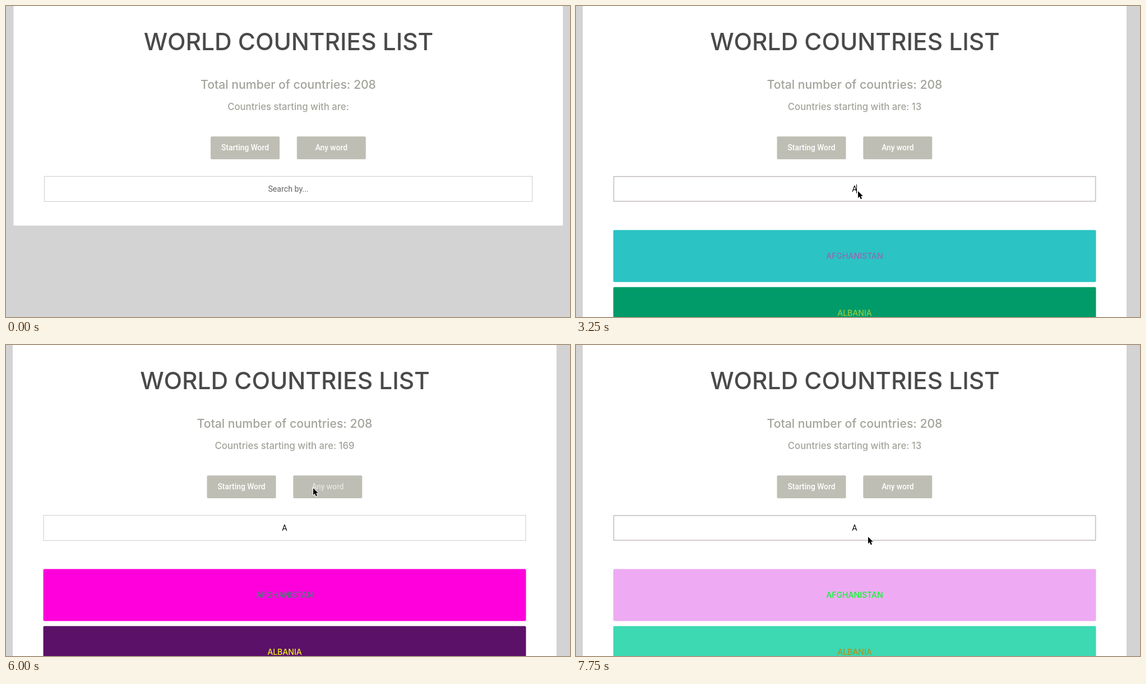
Recreate the animation shown at these times as an HTML page with a canvas. Size 1006 by 556 pixels, loop 8000 ms.

```html
<!DOCTYPE html>
<html lang="en">
<head>
<meta charset="utf-8">
<title>World countries list</title>
<style>
  html, body { margin: 0; width: 100%; height: 100%; overflow: hidden; background: #d3d3d3; }
  canvas { display: block; }
</style>
</head>
<body>
<canvas id="stage" width="1006" height="556"></canvas>
<script>
const ctx = document.getElementById('stage').getContext('2d');
const LOOP = 8000, TICK = 250;
const HEAD = 'Inter, sans-serif', BODY = 'Roboto, sans-serif';

// Pointer stops: time, x, y
const stops = [
  [250, 560, 279], [1250, 496, 329], [1500, 496, 329], [1750, 499, 329],
  [2000, 503, 331], [4500, 503, 331], [5750, 548, 256], [6000, 548, 256],
  [6750, 420, 257], [7250, 420, 257], [7750, 521, 343]
];
const caretOn = [[1250, 2000], [2500, 3000], [3250, 3750], [4250, 4750]];

// Search results: start time, count, then card and label colours
const results = [
  { at: 3250, count: 13, cards: [['#2bc3c3', '#9268b2'], ['#009b68', '#93cb45']] },
  { at: 6000, count: 169, cards: [['#ff00dc', '#3f8574'], ['#5b1168', '#f0f020']] },
  { at: 7250, count: 13, cards: [['#eeabf3', '#00ff28'], ['#3cd9b2', '#b0901e']] }
];

function pointerAt(t) {
  if (t < stops[0][0]) return null;
  for (let i = 1; i < stops.length; i++) {
    const [t0, x0, y0] = stops[i - 1], [t1, x1, y1] = stops[i];
    if (t <= t1) {
      const k = (t - t0) / (t1 - t0);
      return { x: Math.round(x0 + (x1 - x0) * k), y: Math.round(y0 + (y1 - y0) * k) };
    }
  }
  const [, x, y] = stops[stops.length - 1];
  return { x, y };
}

function inside(p, x, y, w, h) {
  return p && p.x >= x && p.x <= x + w && p.y >= y && p.y <= y + h;
}

function label(text, x, y, size, color, family, weight = 500) {
  ctx.font = `${weight} ${size}px ${family}`;
  ctx.fillStyle = color;
  ctx.fillText(text, x, y);
}

function box(x, y, w, h, color) {
  ctx.fillStyle = color;
  ctx.beginPath();
  ctx.roundRect(x, y, w, h, 2);
  ctx.fill();
}

function button(text, x, p) {
  const y = 233.3, w = 123, h = 40.7;
  box(x, y, w, h, '#bebeb4');
  label(text, x + w / 2, 258, 13.8, inside(p, x, y, w, h) ? '#e6e3e0' : '#fff', BODY);
}

function searchField(x, w, text, color, p) {
  const y = 304, h = 46;
  const hover = inside(p, x, y, w, h);
  const line = hover ? 1.7 : 1;
  ctx.strokeStyle = hover ? '#cac2c6' : '#cccccc';
  ctx.lineWidth = line;
  ctx.strokeRect(x + line / 2, y + line / 2, w - line, h - line);
  label(text, x + w / 2, 332, 14.2, color, BODY, 400);
}

function pointer({ x, y }) {
  ctx.save();
  ctx.translate(x, y);
  ctx.beginPath();
  [[0, 0], [0, 12.2], [2.8, 9.6], [4.8, 14.2], [7, 13.3], [5, 8.8], [8.8, 8.8]]
    .forEach(([px, py]) => ctx.lineTo(px, py));
  ctx.closePath();
  ctx.lineJoin = 'round';
  ctx.lineWidth = 1.8;
  ctx.strokeStyle = '#fff';
  ctx.stroke();
  ctx.fillStyle = '#000';
  ctx.fill();
  ctx.restore();
}

function draw(t) {
  const result = results.filter(r => t >= r.at).pop();
  const p = pointerAt(t);
  const cx = result ? 497 : 503.5;
  const fieldX = result ? 66.5 : 68;
  const fieldW = result ? 861 : 871;

  ctx.fillStyle = '#d3d3d3';
  ctx.fillRect(0, 0, 1006, 556);
  ctx.fillStyle = '#fff';
  if (result) ctx.fillRect(12, 0, 970, 556);
  else ctx.fillRect(13.4, 0, 979.9, 392.5);

  ctx.textAlign = 'center';
  label('WORLD COUNTRIES LIST', cx + 0.5, 78.5, 42.4, '#4a4a4a', HEAD);
  label('Total number of countries: 208', cx, 148, 21.2, '#a3a39b', HEAD);
  const count = result ? ' ' + result.count : '';
  label('Countries starting with are:' + count, cx, 186, 16.7, '#a3a39b', HEAD);

  button('Starting Word', cx - 138.5, p);
  button('Any word', cx + 15.3, p);
  searchField(fieldX, fieldW, result ? 'A' : 'Search by...', result ? '#000' : '#626262', p);

  if (caretOn.some(([from, to]) => t >= from && t < to)) {
    ctx.fillStyle = '#000';
    ctx.fillRect(result ? 500 : 503, 319, 1, 16);
  }

  if (result) {
    ['AFGHANISTAN', 'ALBANIA'].forEach((name, i) => {
      const y = 400.5 + i * 102;
      const [fill, ink] = result.cards[i];
      box(fieldX, y, fieldW, 93, fill);
      label(name, cx, y + 51.5, 14.1, ink, HEAD);
    });
  }

  if (p) pointer(p);
}

const start = performance.now();
function frame() {
  const t = (performance.now() - start) % LOOP;
  draw(Math.floor(t / TICK) * TICK);
  requestAnimationFrame(frame);
}
frame();
</script>
</body>
</html>
```
